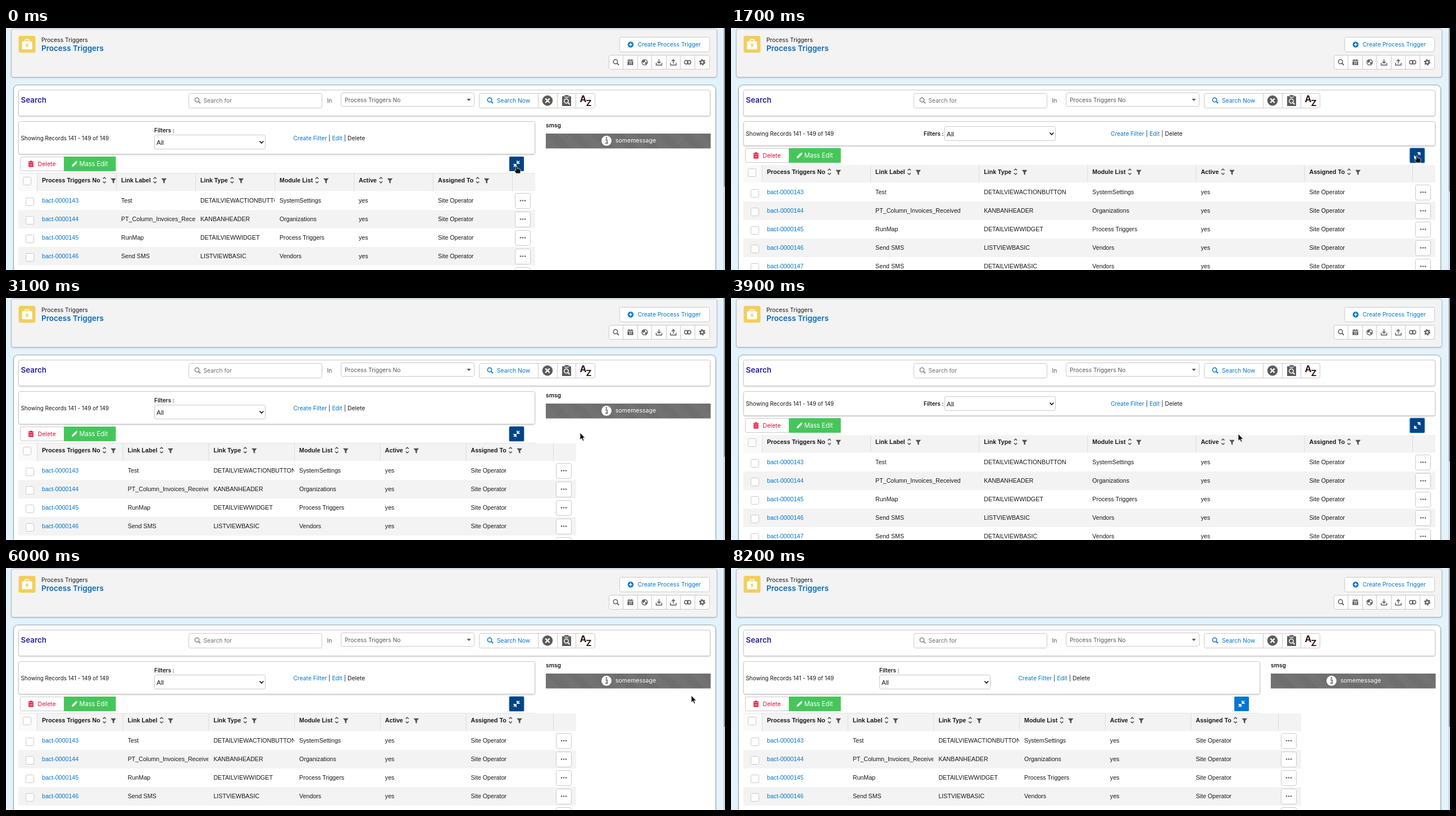
Animation, 1280 px wide and 431 px high, one loop 8300 ms. Source, as an HTML page:

```html
<!DOCTYPE html>
<html lang="en">
<head>
<meta charset="utf-8">
<title>Record list</title>
<style>
html, body { margin: 0; width: 100%; height: 100%; overflow: hidden; background: #e2f3fc; }
#stage { display: block; width: 100vw; height: 100vh; }
text { font: 10.3px Inter, sans-serif; fill: #181818; white-space: pre; }
.blue, .blue text { fill: #0176d3; }
.semi { font-weight: 600; }
.cells text, text.sys { font-family: "Liberation Sans", Arial, sans-serif; font-size: 10.67px; }
.cells .head { font-weight: 700; }
.box { fill: #fff; stroke: #c9c9c9; }
.panel { filter: drop-shadow(0 1.5px 1px #0003); }
.line { fill: none; stroke: #5c5b59; stroke-width: 1.4; }
.solid { fill: #5c5b59; }

.scene, .focus, .pose, #cursor { animation: 8.3s step-end infinite; }
#first { animation-name: first; }
#wide { animation-name: wide; }
#late { animation-name: late; }
.scene .focus { animation-name: focus; }
#cursor { animation-name: travel; }
#arrow { animation-name: arrow; }
#hand { animation-name: hand; }

@keyframes first { 0% { opacity: 1 } 7.228%, 100% { opacity: 0 } }
@keyframes wide {
  0% { opacity: 0 } 7.228% { opacity: 1 } 25.301% { opacity: 0 }
  45.783% { opacity: 1 } 63.855%, 100% { opacity: 0 }
}
@keyframes late {
  0% { opacity: 0 } 25.301% { opacity: 1 } 45.783% { opacity: 0 }
  63.855%, 100% { opacity: 1 }
}
@keyframes focus {
  0% { fill: #014486; filter: none }
  4.819% { fill: #014486; filter: drop-shadow(0 0 1.25px #0176d3) }
  95.18%, 100% { fill: #0176d3; filter: none }
}
@keyframes hand {
  0% { opacity: 1 } 7.228% { opacity: 0 } 18.072% { opacity: 1 } 25.301% { opacity: 0 }
  43.373% { opacity: 1 } 45.783% { opacity: 0 } 59.036% { opacity: 1 } 63.855%, 100% { opacity: 0 }
}
@keyframes arrow {
  0% { opacity: 0 } 7.228% { opacity: 1 } 18.072% { opacity: 0 } 25.301% { opacity: 1 }
  43.373% { opacity: 0 } 45.783% { opacity: 1 } 59.036% { opacity: 0 } 63.855%, 100% { opacity: 1 }
}
@keyframes travel {
  0% { transform: translate(909px, 246px) }
  7.228% { transform: translate(909px, 248px) }
  9.638% { transform: translate(909px, 248px); animation-timing-function: steps(3) }
  13.253% { transform: translate(985px, 249px); animation-timing-function: steps(3) }
  16.867% { transform: translate(1175px, 243px) }
  18.072% { transform: translate(1226px, 236px); animation-timing-function: steps(2) }
  20.481% { transform: translate(1221px, 227px) }
  25.301% { transform: translate(1221px, 228px) }
  28.915% { transform: translate(1180px, 180px) }
  30.12% { transform: translate(1085px, 116px) }
  31.325% { transform: translate(1049px, 160px) }
  32.53% { transform: translate(1049px, 160px); animation-timing-function: steps(4) }
  37.349% { transform: translate(1022px, 240px); animation-timing-function: steps(2) }
  39.759% { transform: translate(980px, 258px); animation-timing-function: steps(3) }
  43.373% { transform: translate(906px, 246px) }
  44.578% { transform: translate(905px, 245px) }
  46.987% { transform: translate(903px, 242px) }
  48.192% { transform: translate(903px, 242px); animation-timing-function: steps(3) }
  51.807% { transform: translate(960px, 247px); animation-timing-function: steps(4) }
  56.626% { transform: translate(1180px, 232px); animation-timing-function: steps(2) }
  59.036% { transform: translate(1220px, 221px) }
  60.24% { transform: translate(1220px, 222px) }
  61.445% { transform: translate(1220px, 223px) }
  72.289% { transform: translate(1220px, 227px) }
  73.493% { transform: translate(1219px, 228px) }
  77.108% { transform: translate(1216px, 230px) }
  79.518% { transform: translate(1215px, 231px) }
  80.722% { transform: translate(1215px, 231px); animation-timing-function: steps(2) }
  83.132% { transform: translate(1150px, 237px); animation-timing-function: steps(5) }
  89.156% { transform: translate(350px, 70px); animation-timing-function: steps(2) }
  91.566% { transform: translate(165px, 13px); animation-timing-function: steps(4) }
  96.385%, 100% { transform: translate(67px, -20px) }
}
</style>
</head>
<body>
<svg id="stage" viewBox="0 0 1280 431" preserveAspectRatio="none">
  <defs>
    <pattern id="stripes" width="28" height="28" patternUnits="userSpaceOnUse" patternTransform="rotate(-45)">
      <rect width="28" height="28" fill="#6e6e6e"/><rect width="14" height="28" fill="#727272"/>
    </pattern>
    <g id="lens"><circle cx="-1" cy="-1" r="3.7" fill="none" stroke-width="1.5"/><path d="M1.8 1.8 5 5" stroke-width="1.9"/></g>
    <g id="sort" fill="none" stroke="#55534f" stroke-width="1.5"><path d="M-2.6-2.4 0-5 2.6-2.4M-2.6 2.4 0 5 2.6 2.4"/></g>
    <path id="funnel" d="M-4.8-4.2H4.8L1.3.3V4.8L-1.3 3.4V.3Z" fill="#55534f"/>
  </defs>

  <rect width="1280" height="431" fill="#e2f3fc"/>
  <rect x="9.5" y="1.5" width="1256" height="86" rx="4" fill="#f3f3f3" stroke="#b9bcbe" class="panel"/>
  <rect x="13.5" y="101.5" width="1250" height="360" rx="8" fill="#fff" stroke="#9da2a6" class="panel"/>

  <!-- page header -->
  <rect x="22.5" y="14" width="30" height="30" rx="3.5" fill="#f2cf5b"/>
  <path d="M34 23.5V21.6Q34 20.6 35 20.6H40Q41 20.6 41 21.6V23.5" fill="none" stroke="#fff" stroke-width="1.5"/>
  <rect x="28.5" y="23.5" width="18" height="14.5" rx="1.8" fill="#fff"/>
  <path d="M38.7 25.5 34.2 31.5H37L36 36 40.8 29.7H38Z" fill="#f2cf5b"/>
  <text x="63" y="24.8">Process Triggers</text>
  <text x="63" y="41.3" class="semi" style="font-size:13.5px;fill:#0a6bb8">Process Triggers</text>
  <rect x="1092.5" y="16.5" width="160" height="26" rx="3" class="box"/>
  <circle cx="1112" cy="29.5" r="5.2" class="blue"/>
  <path d="M1109 29.5H1115M1112 26.5V32.5" stroke="#fff" stroke-width="1.5"/>
  <text x="1124.5" y="33.2" class="blue">Create Process Trigger</text>
  <rect x="1073.5" y="48.5" width="179" height="25" rx="3" class="box"/>
  <path d="M1098.5 48.5V73.5M1124.5 48.5V73.5M1149.5 48.5V73.5M1175.5 48.5V73.5M1200.5 48.5V73.5M1226.5 48.5V73.5" stroke="#c9c9c9"/>
  <use href="#lens" x="1086" y="61" class="line"/>
  <g transform="translate(1111.5 61)">
    <path d="M-5-4.2H5V-2.4H-5ZM-5-1.6H5V5H-5ZM-3-5.5H-1.5V-4H-3ZM1.5-5.5H3V-4H1.5Z" class="solid"/>
    <text y="4" text-anchor="middle" style="font-size:5.5px;fill:#fff;font-weight:700">31</text>
  </g>
  <g transform="translate(1137 61)">
    <circle r="4.9" class="line"/><path d="M-3.5-3 0-4.2 1 -2-1.5 1-4-.5ZM1-.5 4 0 3 3.3 1 3.5Z" class="solid"/>
  </g>
  <path d="M1162.5 55.5V62.5M1159.6 59.8 1162.5 62.8 1165.4 59.8M1157.5 62V66H1167.5V62" class="line"/>
  <path d="M1188 63.5V56.5M1185.1 59.2 1188 56.2 1190.9 59.2M1183 62V66H1193V62" class="line"/>
  <g class="line"><circle cx="1211" cy="61" r="3.2"/><circle cx="1216" cy="61" r="3.2"/></g>
  <circle cx="1239.5" cy="61" r="4.6" class="line" stroke-dasharray="2.4" style="stroke-width:2"/>
  <circle cx="1239.5" cy="61" r="3" class="line" style="stroke-width:2"/>

  <!-- search bar -->
  <rect x="22.5" y="110.5" width="1231" height="46" rx="3" class="box panel"/>
  <text x="26.5" y="133.4" class="semi" style="font-size:13.4px;fill:#27219a">Search</text>
  <rect x="325.5" y="116.5" width="237" height="26" rx="3" class="box"/>
  <use href="#lens" x="341" y="129" class="line" style="stroke:#8a8886"/>
  <text x="351.5" y="132.8" style="fill:#706e6b">Search for</text>
  <text x="571.5" y="133" style="fill:#555">In</text>
  <rect x="596.5" y="115.5" width="237" height="24" rx="3" class="box"/>
  <text x="603" y="131.5" style="fill:#5a5856">Process Triggers No</text>
  <path d="M820.5 126H827.5L824 130.3Z" class="solid"/>
  <rect x="842.5" y="116.5" width="206" height="26" rx="3" class="box"/>
  <path d="M947.5 116.5V142.5M981.5 116.5V142.5M1014.5 116.5V142.5" stroke="#c9c9c9"/>
  <use href="#lens" x="862" y="129" fill="none" stroke="#0176d3"/>
  <text x="874" y="132.8" class="blue">Search Now</text>
  <circle cx="964" cy="129.3" r="9.2" class="solid"/>
  <path d="M960.3 125.6 967.7 133M967.7 125.6 960.3 133" stroke="#fff" stroke-width="2.3"/>
  <path d="M990 121.5H994.5V119.5H1001.5V121.5H1006V139H990Z" class="solid"/>
  <path d="M994.5 123.3H1001.5" stroke="#fff" stroke-width="1.2"/>
  <use href="#lens" x="998.5" y="131" fill="none" stroke="#fff"/>
  <text x="1021.5" y="131.5" style="font-size:16px;font-weight:700;fill:#2b1713">A</text>
  <text x="1032.5" y="139" style="font-size:15px;font-weight:700;fill:#2b1713">Z</text>

  <g id="scenes"></g>

  <g id="cursor" stroke="#fff" stroke-width=".7" fill="#111">
    <path id="arrow" class="pose" d="M0 0V12.6L2.9 9.9 5 14.6 7 13.7 5 9.2H8.8Z"/>
    <path id="hand" class="pose" d="M-1.3 1.3Q0-.8 1.3 1.3V4.4L5.9 5.4Q7.3 5.9 7.2 7.4L6.5 13H-.8L-4.4 7.8Q-4.2 6-1.3 7.8Z"/>
  </g>
</svg>
<script>
const heads = ['Process Triggers No', 'Link Label', 'Link Type', 'Module List', 'Active', 'Assigned To'];
const rows = [
  ['Test', 'DETAILVIEWACTIONBUTTON', 'SystemSettings'],
  ['PT_Column_Invoices_Received', 'KANBANHEADER', 'Organizations'],
  ['RunMap', 'DETAILVIEWWIDGET', 'Process Triggers'],
  ['Send SMS', 'LISTVIEWBASIC', 'Vendors'],
  ['Send SMS', 'DETAILVIEWBASIC', 'Vendors']
].map((r, i) => ['bact-0000' + (143 + i), ...r, 'yes', 'Site Operator']);

const pen = document.createElement('canvas').getContext('2d');
pen.font = '700 10.67px "Liberation Sans", Arial, sans-serif';

const rect = (x, y, w, h, attrs = 'class="box"') =>
  `<rect x="${x}" y="${y}" width="${w}" height="${h}" ${attrs}/>`;
const label = (x, y, str, attrs = '') => `<text x="${x}" y="${y}" ${attrs}>${str}</text>`;
const icon = (id, x, y) => `<use href="#${id}" x="${x}" y="${y}"/>`;
const check = (x, y) => rect(x, y, 14, 14, 'rx="2" class="box"');
const clip = (x, y, w, h, inner) => `<svg x="${x}" y="${y}" width="${w}" height="${h}">${inner}</svg>`;

function filterBar(wide) {
  const mid = wide ? 188.5 : 196, selX = wide ? 380.5 : 264.5, selY = wide ? 175.5 : 190.5;
  return rect(22.5, 166.5, wide ? 1231 : 919, wide ? 43 : 58, 'rx="3" class="box panel"') +
    label(26.5, mid + 3.6, 'Showing Records 141 - 149 of 149', 'style="font-size:9.9px"') +
    label(wide ? 343 : 264, wide ? 192.3 : 185.8, 'Filters :', 'class="semi" style="font-size:10px"') +
    rect(selX, selY, 197, 25, 'rx="3" class="box"') +
    label(selX + 3.5, selY + 17, 'All', 'class="sys" style="font-size:11.5px"') +
    `<path d="M${selX + 187} ${selY + 11}l3.4 3.6 3.4-3.6" fill="none" stroke="#111" stroke-width="1.7"/>` +
    label(wide ? 676 : 511.5, mid + 3.6,
      '<tspan class="blue">Create Filter</tspan> | <tspan class="blue">Edit</tspan> | Delete');
}

function buttons(wide) {
  const y = wide ? 214 : 229, x = wide ? 1208.7 : 896;
  const art = wide
    ? 'M1.5-1.5 5-5M1.2-5H5V-1.2ZM-1.5 1.5-5 5M-5 1.2V5H-1.2Z'
    : 'M1.5-1.5 5.2-5.2M1-4.8V-1H4.8ZM-1.5 1.5-5.2 5.2M-1 4.8V1H-4.8Z';
  return rect(25.5, y + .5, 78, 25, 'rx="2.5" class="box"') +
    rect(103, y, 92.5, 26, 'fill="#45c65a"') +
    `<g transform="translate(44.5 ${y + 13})" fill="#e0103a"><path d="M-5-4.3H-2V-5.6H2V-4.3H5V-2.8H-5ZM-4.2-1.9H4.2V5.6H-4.2Z"/>
      <path d="M-1.5-.5V4M1.5-.5V4" stroke="#fff"/></g>` +
    label(56.5, y + 16.8, 'Delete', 'style="font-size:10.6px;fill:#e0103a"') +
    `<path transform="translate(122 ${y + 13})" d="M-5 5-4.2 1.6 2-4.6 4.6-2-1.6 4.2ZM2.7-5.2 3.5-5.7 5.5-3.7 5.2-2.7Z" fill="#fff"/>` +
    label(130.5, y + 16.8, 'Mass Edit', 'style="font-size:11.1px;fill:#fff"') +
    rect(x, y, 26, 26, 'rx="1.5" class="focus"') +
    `<path transform="translate(${x + 13} ${y + 13})" d="${art}" fill="#fff" stroke="#fff" stroke-width="1.4"/>`;
}

function table(top, pitch, right) {
  const colX = i => 55 + i * pitch;
  let out = rect(22, top, 33, 31.5, 'fill="#fafaf9"') +
    rect(55, top, right - 55, 31.5, 'fill="#f3f3f3"') + check(30.5, top + 6.5);
  heads.forEach((name, i) => {
    const end = 9 + pen.measureText(name).width;
    out += clip(colX(i), top, pitch, 31, label(9, 16.3, name, 'class="head"') +
      icon('sort', end + 7.5, 12) + icon('funnel', end + 23.5, 13));
    out += rect(colX(i), top, 1, 31, 'fill="#dcdcdc"');
  });
  out += rect(right - 41, top, 1, 31, 'fill="#dcdcdc"');
  rows.forEach((row, r) => {
    const y = top + 32 + r * 33;
    if (r % 2) out += rect(22, y, right - 22, 33, 'fill="#f3f3f3"');
    out += check(35.5, y + 11.5);
    row.forEach((str, i) => {
      out += clip(colX(i), y, pitch, 33, label(9, 20.3, str, i ? '' : 'class="blue"'));
    });
    out += rect(right - 35.5, y + 3.5, 27, 27, 'rx="3" class="box"');
    for (const d of [-4, 0, 4]) out += `<circle cx="${right - 22 + d}" cy="${y + 16.5}" r="1.3" class="solid"/>`;
  });
  return `<g class="cells">${out}</g>`;
}

const side = label(961, 177, 'smsg', 'class="semi"') +
  rect(961, 188, 293.5, 26.5, 'fill="url(#stripes)"') +
  '<circle cx="1069" cy="200.8" r="9" fill="#fff"/>' +
  '<path d="M1067 199.3H1070.2V205M1066.8 205.2H1071.6" fill="none" stroke="#6d6d6d" stroke-width="1.7"/>' +
  '<circle cx="1069" cy="196" r="1.4" fill="#6d6d6d"/>' +
  label(1085, 204.3, 'somemessage', 'style="font-size:10.5px;fill:#fff"');

function scene(id, wide, pitch, right) {
  const thumb = rect(1277, 0, 3, 431, 'fill="#d3d8db"') + rect(1278, 0, 2, wide ? 291 : 283, 'fill="#8b9299"');
  const rule = wide ? '' : rect(22, 258, 920, 1, 'fill="#e4e4e4"');
  return `<g id="${id}" class="scene">${filterBar(wide)}${buttons(wide)}${rule}` +
    `${table(wide ? 244 : 259, pitch, right)}${wide ? '' : side}${thumb}</g>`;
}

document.getElementById('scenes').innerHTML =
  scene('first', false, 141, 942) + scene('wide', true, 193.1, 1254) + scene('late', false, 152.7, 1015);
</script>
</body>
</html>
```
